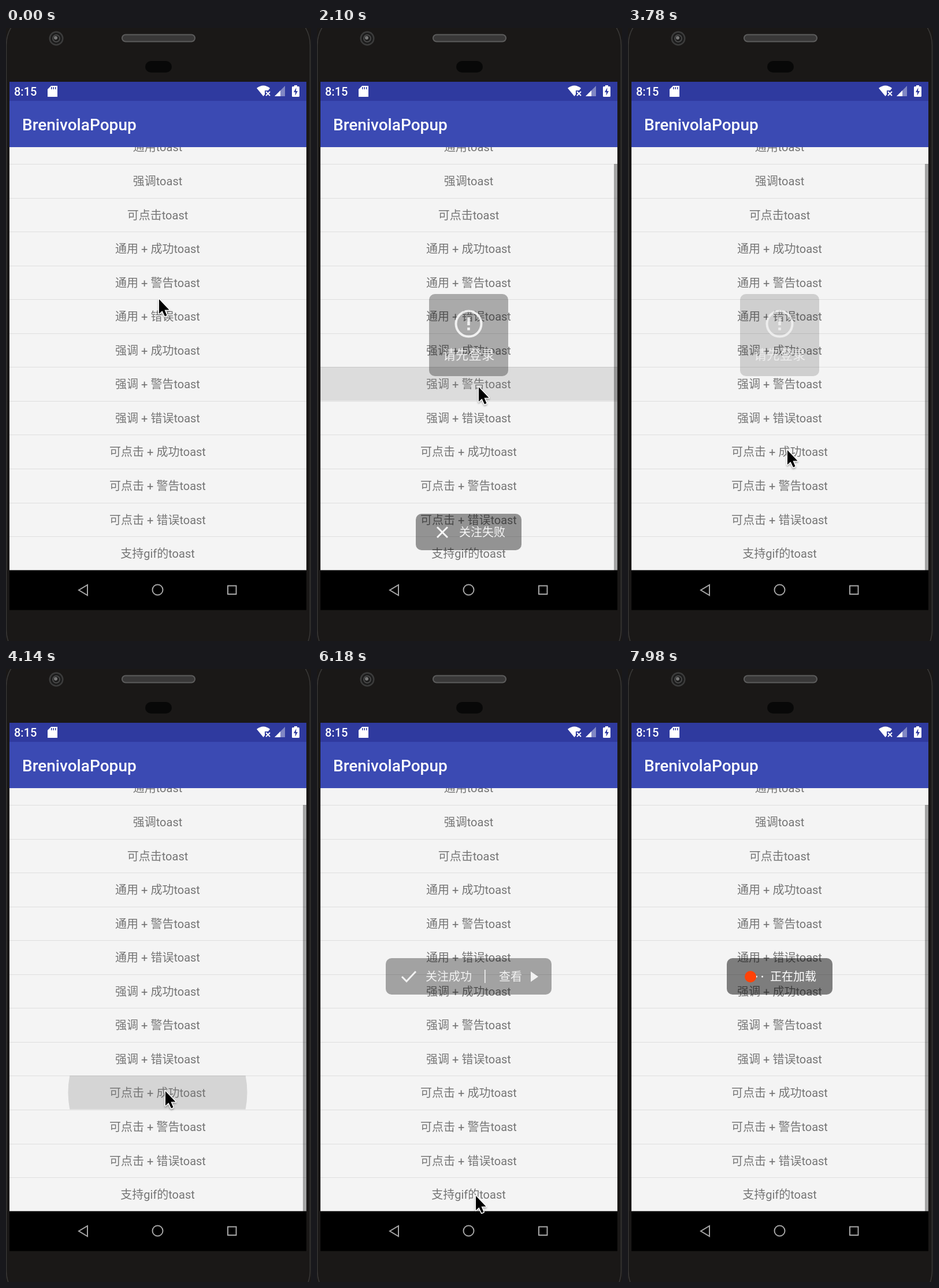
Write an HTML page with a canvas that moves like this. It is 528 px wide and 1060 px high and loops after 8040 ms.

```html
<!DOCTYPE html>
<html lang="zh-CN">
<head>
<meta charset="utf-8">
<style>
html, body { margin: 0; height: 100%; overflow: hidden; background: #1a1817; }
canvas { display: block; width: 528px; height: 1060px; }
</style>
</head>
<body>
<canvas id="stage" width="528" height="1060"></canvas>
<script>
const c = document.getElementById('stage').getContext('2d');
const LOOP = 8040, STEP = 60, ROW = 58.55, FADE = 480, HOLD = 1650, GLIDE = 480;
const FONT = 'Roboto, "Noto Sans CJK SC", "Noto Sans CJK", sans-serif';
const KINDS = ['通用', '强调', '可点击'], RESULTS = ['成功', '警告', '错误'];
const ROWS = [...KINDS, ...KINDS.flatMap(k => RESULTS.map(r => `${k} + ${r}`)), '支持gif的'];
// row and press time
const TAPS = [[5, 60], [7, 1800], [9, 4010], [12, 6720]];
// pointer stops: arrival time, x, y
const STOPS = [[0, 265, 468], [720, 261, 586], [1200, 280, 620], [3000, 282, 747],
  [3780, 276, 729], [4920, 275, 910], [7980, 150, 1064]];

const clamp = v => Math.max(0, Math.min(1, v));
const ramp = (t, a, b) => clamp((t - a) / (b - a));
const smooth = k => k * k * (3 - 2 * k);
const rowTop = i => Math.round(235 + (i - 1) * ROW);

function rect(x, y, w, h, fill) {
  c.fillStyle = fill;
  c.fillRect(x, y, w, h);
}
function round(x, y, w, h, r, fill) {
  c.beginPath();
  c.roundRect(x, y, w, h, r);
  c.fillStyle = fill;
  c.fill();
}
function disc(x, y, r, fill) {
  c.beginPath();
  c.arc(x, y, r, 0, 7);
  c.fillStyle = fill;
  c.fill();
}
function ring(x, y, r, color, width) {
  c.beginPath();
  c.arc(x, y, r, 0, 7);
  c.strokeStyle = color;
  c.lineWidth = width;
  c.stroke();
}
function trace(points) {
  c.beginPath();
  for (let i = 0; i < points.length; i += 2) c.lineTo(points[i], points[i + 1]);
}
function poly(points, fill) {
  trace(points);
  c.fillStyle = fill;
  c.fill();
}
function line(points, color, width, closed) {
  trace(points);
  if (closed) c.closePath();
  c.strokeStyle = color;
  c.lineWidth = width;
  c.stroke();
}
function cross(x, y, r, width) {
  line([x - r, y - r, x + r, y + r], '#fff', width);
  line([x + r, y - r, x - r, y + r], '#fff', width);
}
function text(s, x, y, size, color, align = 'left', weight = 400) {
  c.font = `${weight} ${size}px ${FONT}`;
  c.textAlign = align;
  c.fillStyle = color;
  c.fillText(s, x, y);
}

function phone() {
  rect(0, 0, 528, 1060, '#1a1817');
  // rim with rounded upper corners
  c.beginPath();
  c.roundRect(.5, -30, 526, 1130, 60);
  c.strokeStyle = '#3a3938';
  c.lineWidth = 1.5;
  c.stroke();
  disc(87, 18, 12.5, '#3c3c3c');
  disc(87, 18, 10, '#1c1c1c');
  ring(87, 18, 6, '#484848', 2);
  disc(86, 17, 3, '#777');
  round(200, 10.5, 128, 14, 7, '#5c5c5c');
  round(202, 12.5, 124, 10, 5, '#393838');
  round(241, 57, 46, 20, 10, '#080808');
}

function bars() {
  rect(6, 93, 514, 33, '#2f3a9f');
  rect(6, 126, 514, 80, '#3b4ab3');
  text('8:15', 14, 117, 20, '#fff', 'left', 500);
  // memory card
  poly([78, 100, 89, 100, 89, 119, 72, 119, 72, 106], '#fff');
  for (let x = 78; x < 87; x += 3.5) rect(x, 102, 1.5, 4, '#2f3a9f');
  // wifi
  c.beginPath();
  c.moveTo(445.5, 118);
  c.lineTo(434, 104);
  c.quadraticCurveTo(445.5, 95, 457, 104);
  c.fillStyle = '#fff';
  c.fill();
  rect(448, 108, 11, 11, '#2f3a9f');
  cross(453.5, 113.5, 3.5, 2);
  // signal
  poly([483, 100, 483, 118, 465, 118], '#8188c4');
  poly([475, 108, 475, 118, 465, 118], '#fff');
  // battery
  round(495, 101, 13, 18, 1.5, '#fff');
  rect(499, 99, 5, 3, '#fff');
  poly([502.5, 103, 498, 111, 501, 111, 500.5, 117, 505, 109, 502, 109], '#2f3a9f');
  text('BrenivolaPopup', 28, 177, 28, '#fff', 'left', 500);

  rect(6, 937.5, 514, 69, '#000');
  line([141, 963, 141, 981, 126, 972], '#a6a6a6', 2, true);
  ring(262.5, 971.5, 9, '#a6a6a6', 2);
  c.strokeRect(384, 964.5, 14.5, 14.5);
}

function ripple(row, age) {
  if (age < 0 || age > 600) return;
  const y = rowTop(row);
  c.save();
  c.beginPath();
  c.rect(6, y, 514, ROW);
  c.clip();
  disc(262.5, y + ROW / 2, 40 + 230 * ramp(age, 0, 260),
    `rgba(0,0,0,${.13 * (1 - ramp(age, 220, 560))})`);
  c.restore();
}

function list(t) {
  rect(6, 206, 514, 732, '#f4f4f4');
  for (const [row, at] of TAPS) ripple(row, t - at);
  ROWS.forEach((s, i) => {
    const y = rowTop(i);
    if (i) rect(6, y, 514, 1, 'rgba(0,0,0,.09)');
    text(s + 'toast', 262.5, y + 37, 20, '#757575', 'center');
  });
  const bar = ramp(t, 180, 240) - ramp(t, 5400, 5820) + ramp(t, 6720, 6780);
  rect(514, 235, 6, 703, `rgba(0,0,0,${.33 * bar})`);
}

function toast(age, x, y, w, h, draw) {
  const alpha = ramp(age, 0, FADE) * (1 - ramp(age, HOLD, HOLD + FADE));
  if (!alpha) return;
  c.save();
  round(x, y, w, h, 10, `rgba(0,0,0,${.49 * alpha})`);
  // the contents come up faster than the panel
  c.globalAlpha = alpha ** .4;
  draw();
  c.restore();
}

function toasts(t) {
  toast(t - 360, 171, 840, 183, 63, () => {
    cross(217, 872, 9, 3);
    text('关注失败', 246, 879, 20, '#fff');
  });
  toast(t - 1800, 194, 460, 137, 142, () => {
    ring(262.5, 511.5, 22, '#fff', 4);
    rect(260.2, 500, 4.6, 14, '#fff');
    rect(260.2, 518, 4.6, 4.6, '#fff');
    text('请先登录', 262.5, 573, 22.4, '#fff', 'center');
  });
  toast(t - 4380, 119, 500, 287, 63, () => {
    line([147, 532, 155, 540, 171, 523], '#fff', 3);
    text('关注成功', 188, 539, 20, '#fff');
    rect(290, 520, 1.6, 23, '#fff');
    text('查看', 315, 539, 20, '#fff');
    poly([370, 523, 370, 541, 383, 532], '#fff');
  });
  toast(t - 7020, 171, 500, 183, 63, () => {
    const x = 232 - t / 40 % 10;
    disc(x, 532, 1.4, '#fff');
    if (x < 224) disc(x + 10, 532, 1.4, '#fff');
    disc(212, 532, 10, '#ff4208');
    text('正在加载', 246, 539, 20, '#fff');
  });
}

function pointer(t) {
  let [, x, y] = STOPS[0];
  for (const [at, nx, ny] of STOPS.slice(1)) {
    const k = smooth(ramp(t, at - GLIDE, at));
    x += (nx - x) * k;
    y += (ny - y) * k;
  }
  c.save();
  c.translate(x, y + 1);
  c.lineJoin = 'round';
  c.shadowColor = 'rgba(0,0,0,.3)';
  c.shadowBlur = 3;
  c.shadowOffsetY = 2;
  const arrow = [0, 0, 0, 25, 5.5, 20, 10, 29.5, 13.5, 28, 9.5, 18.5, 17.5, 18.5];
  line(arrow, '#fff', 3, true);
  c.shadowColor = 'transparent';
  poly(arrow, '#000');
  c.restore();
}

function frame(now) {
  const t = Math.floor(now % LOOP / STEP) * STEP;
  phone();
  list(t);
  bars();
  toasts(t);
  pointer(t);
}

const start = performance.now();
(function tick() {
  frame(performance.now() - start);
  requestAnimationFrame(tick);
})();
</script>
</body>
</html>
```
